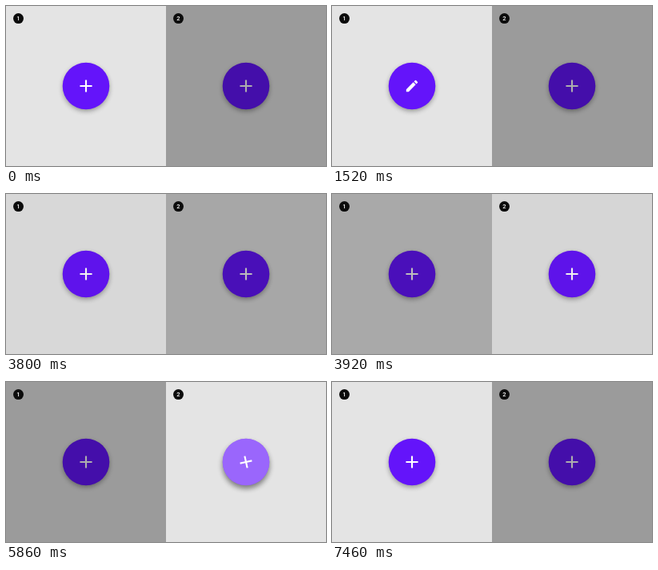
An HTML page that plays this animation: 400 px wide and 200 px high, repeating every 7480 ms.

```html
<!DOCTYPE html>
<html lang="en">
<head>
<meta charset="utf-8">
<title>Button icon transitions</title>
<style>
  html, body { margin: 0; width: 100%; height: 100%; overflow: hidden; background: #e4e4e4; }
  svg { display: block; width: 100vw; height: 100vh; }
  text { font: 500 7.5px Roboto, Arial, sans-serif; fill: #fff; text-anchor: middle; }
</style>
</head>
<body>
<svg id="stage" viewBox="0 0 400 200">
  <defs>
    <filter id="blur" x="-50%" y="-50%" width="200%" height="200%">
      <feGaussianBlur stdDeviation="3"/>
    </filter>
    <path id="plus" transform="scale(1.08) translate(-12 -12)"
      d="M19 13h-6v6h-2v-6H5v-2h6V5h2v6h6z"/>
    <path id="pencil" transform="scale(.8) translate(-12 -12)"
      d="M3 17.25V21h3.75L17.81 9.94l-3.75-3.75L3 17.25zM20.71 7.04a1 1 0 0 0 0-1.41l-2.34-2.34a1 1 0 0 0-1.41 0l-1.83 1.83 3.75 3.75 1.83-1.83z"/>
  </defs>
</svg>
<script>
const LOOP = 7480;
const DIM = 0.32;
const stage = document.getElementById('stage');

const clamp = v => Math.min(1, Math.max(0, v));
const ramp = (t, start, length) => clamp((t - start) / length);

function bezier(x1, y1, x2, y2) {
  const at = (s, a, b) => 3 * (1 - s) ** 2 * s * a + 3 * (1 - s) * s * s * b + s ** 3;
  return x => {
    if (x <= 0 || x >= 1) return clamp(x);
    let low = 0, high = 1;
    for (let i = 0; i < 24; i++) {
      const mid = (low + high) / 2;
      if (at(mid, x1, x2) < x) low = mid; else high = mid;
    }
    return at(low, y1, y2);
  };
}
const standard = bezier(.4, 0, .2, 1);
const emphasized = bezier(.2, 0, 0, 1);

function makePanel(x, label, opens, closes, spins) {
  const group = document.createElementNS('http://www.w3.org/2000/svg', 'g');
  group.setAttribute('transform', `translate(${x} 0)`);
  group.innerHTML = `
    <rect width="200" height="200" fill="#e4e4e4"/>
    <circle class="shadow" cx="100" filter="url(#blur)"/>
    <circle cx="100" cy="100" r="29.3" fill="#6414fa"/>
    <circle class="glow" cx="100" cy="100" r="29.3" fill="#fff"/>
    <g class="icon" fill="#fff">
      <use class="add" href="#plus"/><use class="edit" href="#pencil"/>
    </g>
    <rect class="dim" width="200" height="200"/>
    <circle cx="15.5" cy="15.6" r="6.5" fill="#0c0c0c"/>
    <text x="15.5" y="18.3">${label}</text>`;
  stage.append(group);
  const part = name => group.querySelector('.' + name);
  return {
    opens, closes, spins,
    shadow: part('shadow'), glow: part('glow'), icon: part('icon'),
    add: part('add'), edit: part('edit'), dim: part('dim')
  };
}

function drawPanel(panel, t, dim) {
  const closing = t >= panel.closes;
  const age = t - (closing ? panel.closes : panel.opens);
  const press = standard(ramp(age, 0, 170)) * (1 - standard(ramp(age, 290, 230)));
  const turn = standard(ramp(age, 0, 380));
  const swap = panel.spins ? ramp(turn, .4, .2) : standard(ramp(age, 40, 220));
  const edit = closing ? 1 - swap : swap;
  const angle = panel.spins ? 180 * (turn - 1) : 0;

  panel.shadow.setAttribute('cy', 102.5 + 1.5 * press);
  panel.shadow.setAttribute('r', 28.8 + .8 * press);
  panel.shadow.setAttribute('opacity', .38 + .06 * press);
  panel.glow.setAttribute('opacity', .35 * press);
  panel.icon.setAttribute('transform', `translate(100 100) rotate(${age < 0 ? 0 : angle})`);
  panel.add.setAttribute('opacity', 1 - edit);
  panel.edit.setAttribute('opacity', edit);
  panel.dim.setAttribute('opacity', DIM * dim);
}

const left = makePanel(0, '1', 1000, 2140, false);
const right = makePanel(200, '2', 4500, 5600, true);

function draw(t) {
  const focus = emphasized(ramp(t, 3760, 400)) - standard(ramp(t, 7260, 210));
  drawPanel(left, t, focus);
  drawPanel(right, t, 1 - focus);
}

const began = performance.now();
function tick() {
  draw((performance.now() - began) % LOOP);
  requestAnimationFrame(tick);
}
tick();
</script>
</body>
</html>
```
